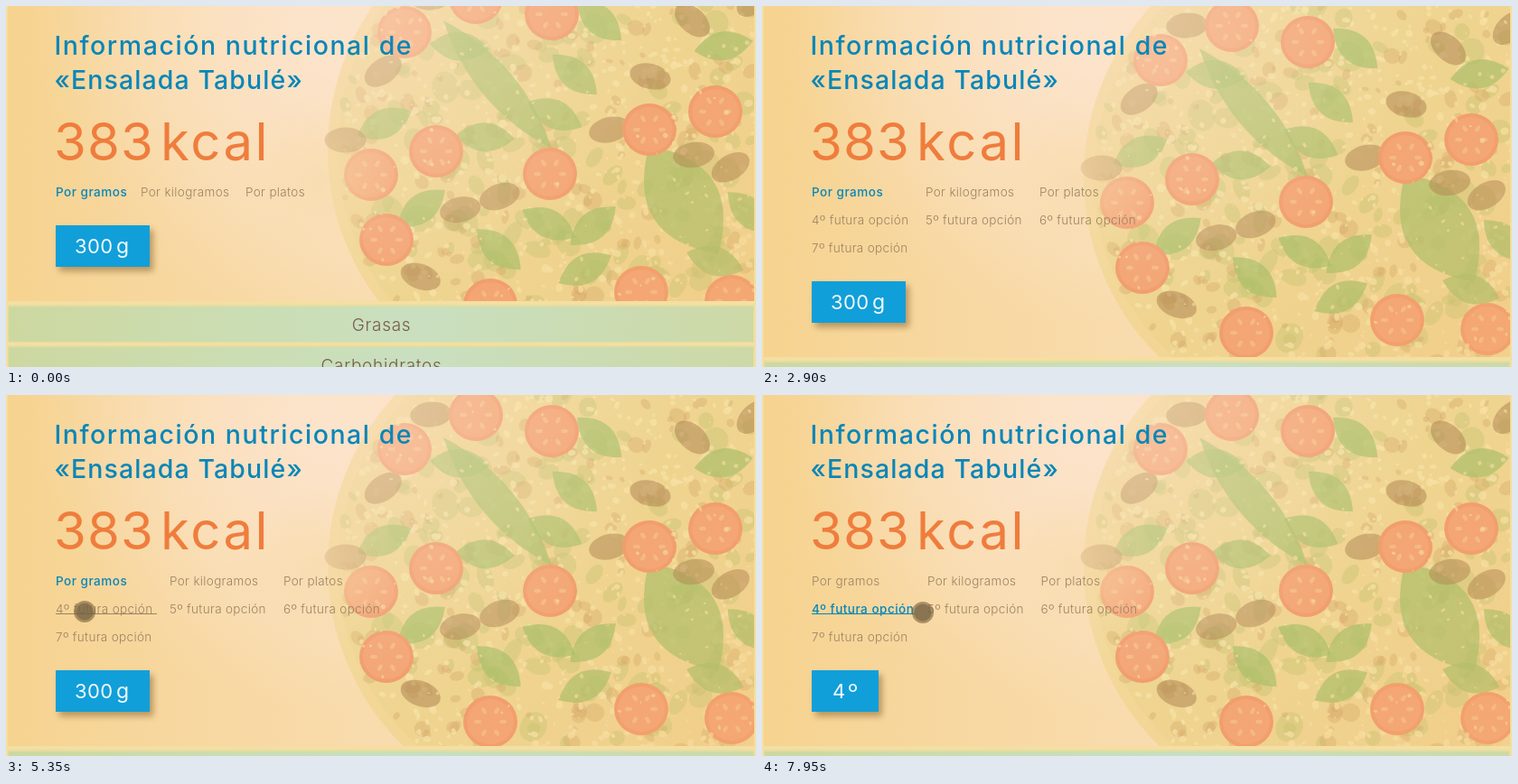
An HTML page with a canvas for the animation above (8 s loop, 830 by 400 pixels).

```html
<!DOCTYPE html>
<html lang="es">
<head>
<meta charset="utf-8">
<title>Información nutricional</title>
<style>
html, body { margin: 0; width: 100%; height: 100%; overflow: hidden; background: #f4dfa2; }
canvas { display: block; }
</style>
</head>
<body>
<canvas id="stage" width="830" height="400"></canvas>
<script>
const LOOP = 8000, W = 830, H = 400, ROW = 31;
const BLUE = [8, 134, 184], MUTED = [156, 130, 99];
const FONT = 'Inter, "Open Sans", sans-serif';
const PIZZA = { x: 635, y: 190, r: 279 };
const ctx = document.getElementById('stage').getContext('2d');

const clamp = v => Math.max(0, Math.min(1, v));
const mix = (a, b, k) => a + (b - a) * k;
const mixColor = (a, b, k, alpha = 1) =>
  `rgba(${a.map((v, i) => Math.round(mix(v, b[i], k))).join(',')},${alpha})`;

function seeded(seed) {
  return () => (seed = (seed * 16807) % 2147483647) / 2147483647;
}

function oval(c, x, y, rx, ry, color, angle = 0) {
  c.fillStyle = color;
  c.beginPath();
  c.ellipse(x, y, rx, ry, angle, 0, Math.PI * 2);
  c.fill();
}

function leaf(c, x, y, length, width, angle) {
  c.save();
  c.translate(x, y);
  c.rotate(angle);
  c.fillStyle = 'rgba(166,193,106,.72)';
  c.beginPath();
  c.moveTo(-length / 2, 0);
  c.quadraticCurveTo(0, width, length / 2, 0);
  c.quadraticCurveTo(0, -width, -length / 2, 0);
  c.fill();
  c.restore();
}

function tomato(c, x, y) {
  oval(c, x, y, 30, 29, '#f19a6c');
  oval(c, x, y, 26, 25, '#f3a374');
  for (let i = 0; i < 6; i++) {
    const a = i * Math.PI / 3;
    oval(c, x + 14 * Math.cos(a), y + 14 * Math.sin(a), 4, 2.2, '#f4b985', a);
  }
}

function makePizza() {
  const layer = document.createElement('canvas');
  layer.width = W;
  layer.height = H;
  const c = layer.getContext('2d'), rnd = seeded(71);
  const { x: cx, y: cy, r: radius } = PIZZA;

  const spot = () => {
    const x = mix(375, W, rnd()), y = mix(0, H, rnd());
    return Math.hypot(x - cx, y - cy) < radius - 14 ? [x, y] : spot();
  };
  const scatter = (count, color, min, max) => {
    for (let i = 0; i < count; i++) {
      const s = mix(min, max, rnd());
      oval(c, ...spot(), s, s * mix(.5, 1, rnd()), color, rnd() * Math.PI);
    }
  };

  oval(c, cx, cy, radius, radius, '#f2d898');
  oval(c, cx, cy, radius - 11, radius - 11, '#eed692');
  scatter(130, 'rgba(190,196,112,.4)', 6, 18);
  scatter(160, 'rgba(204,160,96,.32)', 3, 11);
  scatter(600, 'rgba(246,228,168,.75)', 1.5, 5);

  const anchors = [
    [520, 22], [604, 40], [441, 60], [476, 192], [404, 218], [602, 217],
    [421, 290], [712, 168], [785, 148], [536, 362], [703, 348], [803, 358]
  ];
  const taken = [...anchors];
  const place = (count, gap, draw) => {
    for (let tries = 0; count > 0 && tries < 600; tries++) {
      const [x, y] = spot();
      if (taken.some(([px, py]) => Math.hypot(px - x, py - y) < gap)) continue;
      taken.push([x, y]);
      draw(x, y, mix(-.8, .8, rnd()));
      count--;
    }
  };

  // the two largest leaves
  leaf(c, 544, 118, 186, 38, .87);
  leaf(c, 750, 246, 142, 78, 1.0);
  taken.push([544, 118], [750, 246]);
  place(14, 46, (x, y, a) => leaf(c, x, y, 66, 32, a));
  place(12, 40, (x, y, a) => oval(c, x, y, 23, 14, 'rgba(172,132,80,.55)', a));
  anchors.forEach(p => tomato(c, ...p));
  scatter(180, 'rgba(246,226,168,.6)', 1, 3);

  // warm tint at the lower right
  const warm = c.createLinearGradient(520, 100, W, H);
  warm.addColorStop(0, 'rgba(248,190,120,0)');
  warm.addColorStop(1, 'rgba(248,182,112,.25)');
  c.globalCompositeOperation = 'source-atop';
  c.fillStyle = warm;
  c.fillRect(0, 0, W, H);
  return layer;
}
const pizza = makePizza();

function glow(x, y, r, rgb, alpha) {
  const g = ctx.createRadialGradient(x, y, 0, x, y, r);
  g.addColorStop(0, `rgba(${rgb},${alpha})`);
  g.addColorStop(1, `rgba(${rgb},0)`);
  ctx.fillStyle = g;
  ctx.fillRect(0, 0, W, H);
}

function text(str, x, y, size, weight, color, spacing = 0, align = 'left') {
  ctx.font = `${weight} ${size}px ${FONT}`;
  ctx.letterSpacing = spacing + 'px';
  ctx.textAlign = align;
  ctx.fillStyle = color;
  ctx.fillText(str, x, y);
}

function drawPanel(bottom) {
  ctx.save();
  ctx.beginPath();
  ctx.rect(2, 0, 826, bottom);
  ctx.clip();
  const g = ctx.createLinearGradient(0, 0, 420, 0);
  g.addColorStop(0, '#f6d38f');
  g.addColorStop(.3, '#f7d69b');
  g.addColorStop(1, '#f9dcae');
  ctx.fillStyle = g;
  ctx.fillRect(0, 0, W, bottom);
  glow(360, 20, 330, '253,232,216', .8);
  ctx.drawImage(pizza, 0, (bottom - 389) / 2);
  glow(400, 0, 330, '252,226,200', .55);
  glow(345, 190, 90, '248,218,168', .6);
  ctx.restore();
}

function drawBar(y, label) {
  ctx.fillStyle = 'rgba(226,222,160,.8)';
  ctx.fillRect(2, y - 2, 826, 42);
  const g = ctx.createLinearGradient(0, 0, W, 0);
  g.addColorStop(0, '#cdd8a0');
  g.addColorStop(.3, '#cbddb2');
  g.addColorStop(.55, '#c9dfbf');
  g.addColorStop(1, '#cdd9a6');
  ctx.fillStyle = g;
  ctx.fillRect(3, y, 824, 39);
  text(label, 415.5, y + 27, 19, 300, '#765c4c', .7, 'center');
}

function drawOptions(count, chosen, hover) {
  const col2 = (count > 3 ? 181 : 149) + 2 * chosen;
  const col3 = col2 + (count > 4 ? 126 : 116) - chosen * .5;
  const columns = [55, col2, col3];
  const names = ['Por gramos', 'Por kilogramos', 'Por platos'];
  for (let i = 0; i < count; i++) {
    const on = i === 0 ? 1 - chosen : i === 3 ? chosen : 0;
    const weight = 300 + Math.round(on * 2) * 100;
    const color = mixColor(MUTED, BLUE, on);
    const x = columns[i % 3], y = 211 + ROW * Math.floor(i / 3);
    text(names[i] || `${i + 1}º futura opción`, x, y, 13.5, weight, color, mix(.33, .5, on));
    if (i === 3 && hover) {
      ctx.fillStyle = color;
      ctx.fillRect(55, 242, 112 + 2 * chosen, 1);
    }
  }
}

function drawButton(y, width, picked) {
  ctx.save();
  ctx.shadowColor = 'rgba(120,85,35,.5)';
  ctx.shadowBlur = 7;
  ctx.shadowOffsetX = 4;
  ctx.shadowOffsetY = 5;
  ctx.fillStyle = '#119fda';
  ctx.fillRect(55, y, width, 46);
  ctx.restore();
  if (picked) {
    text('4º', 55 + width / 2 + 1.5, y + 31, 22, 400, '#f3fafc', 3, 'center');
  } else {
    text('300', 76, y + 31, 22, 400, '#f3fafc', .4);
    text('g', 122, y + 31, 23, 400, '#f3fafc');
  }
}

function pointerAt(t) {
  const left = 1 - clamp((t - 3350) / 2200);
  const away = clamp((t - 7150) / 800);
  return {
    x: 87 - 145 * left ** 5 + 91 * away ** 1.6,
    y: 241 - 264 * left ** 2.3
  };
}

function drawPointer({ x, y }, press) {
  const r = 12 - press;
  oval(ctx, x, y, r, r, mixColor([125, 100, 62], [95, 84, 62], press, .62));
  oval(ctx, x, y, 9.5, 9.5, mixColor([115, 98, 70], [80, 74, 60], press, .6));
}

function render(t) {
  const count = 3 + Math.floor(clamp((t + 300) / 3200) * 4);
  const extra = ROW * (Math.ceil(count / 3) - 1);
  const picked = t >= 6250;
  const chosen = 1 - (1 - clamp((t - 6250) / 800)) ** 2;
  const pointer = pointerAt(t);

  ctx.fillStyle = '#f4dfa2';
  ctx.fillRect(0, 0, W, H);
  drawPanel(327 + extra);
  drawBar(333 + extra, 'Grasas');
  drawBar(378 + extra, 'Carbohidratos');

  text('Información nutricional de', 53.5, 54, 28.5, 500, '#0886b8', 1.55);
  text('«Ensalada Tabulé»', 53.5, 92, 28.5, 500, '#0886b8', 1.1);
  text('383', 53, 171, 58, 400, '#ef7d3d', 1.2);
  text('kcal', 171, 171, 58, 400, '#ef7d3d', 2.6);

  drawOptions(count, chosen, t > 3350 && pointer.y > 226);
  drawButton(243 + extra, 104 - 30 * chosen, picked);
  if (t >= 3350) {
    const press = clamp((t - 6150) / 100) * (1 - clamp((t - 7000) / 150));
    drawPointer(pointer, press);
  }
}

function tick() {
  render(performance.now() % LOOP);
  requestAnimationFrame(tick);
}
tick();
</script>
</body>
</html>
```
